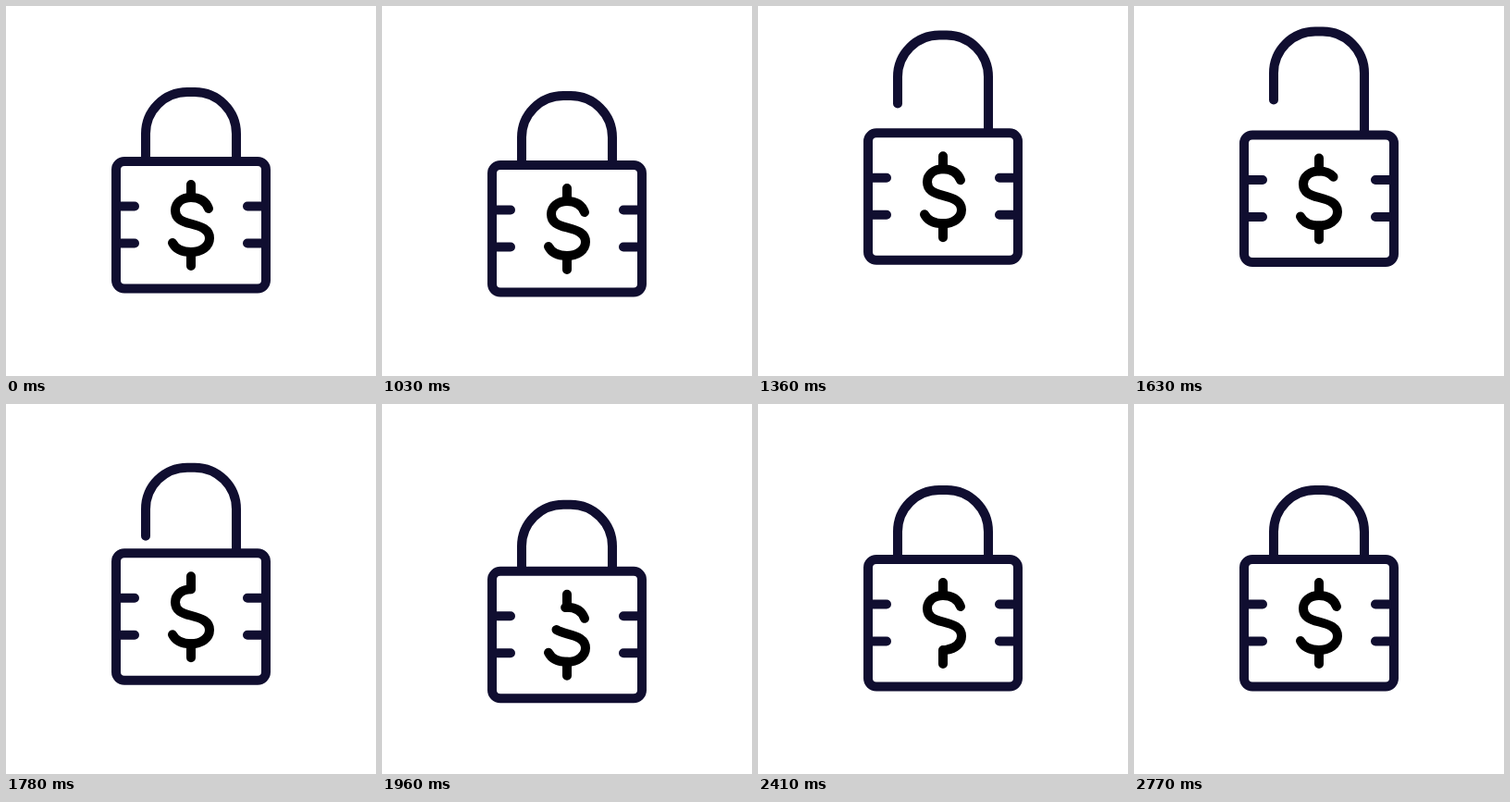
An HTML page for the animation above (2.89 s loop, 400x400 px).

```html
<!DOCTYPE html>
<html lang="en">
<head>
<meta charset="utf-8">
<title>Money lock</title>
<style>
  html, body { margin: 0; width: 100%; height: 100%; overflow: hidden; background: #fff; }
  svg { display: block; width: 100vw; height: 100vh; }
  path, rect { fill: none; stroke: #100e30; stroke-width: 10; stroke-linecap: round; stroke-linejoin: round; }
  rect { fill: #fff; }
  .dollar path { stroke: #000; }
</style>
</head>
<body>
<svg viewBox="0 0 400 400">
  <path id="shackle" d="M151 167V138A45 45 0 0 1 196 93H204A45 45 0 0 1 249 138V215"/>
  <g id="body">
    <rect x="119" y="168" width="162" height="137.5" rx="9"/>
    <path d="M119 216.5H139M119 256.5H139M281 216.5H261M281 256.5H261"/>
    <g class="dollar">
      <path d="M200 193V207M200 266V281"/>
      <path id="head" pathLength="100"/>
      <path id="tail" pathLength="100"/>
    </g>
  </g>
</svg>
<script>
const LOOP = 2890, START = 1030, STEP = 30;
const CURVE = 'M219 219C216 211 209 207 200 207C190 207 183 213 183 221C183 230 190 233 200 235.5' +
  'C212 238.5 220 242 220 251C220 260 211 266 200 266C190 266 183 262 180 256';

// Keys are [time in ms, value]
const bodyY = [[1000, 0], [1030, 4], [1095, 13], [1210, -18], [1440, -33], [1540, -32],
  [1630, -28.5], [1945, 13], [2200, -3.5], [2420, 0]];
const lift = [[1150, 0], [1210, -3], [1430, -38], [1540, -38], [1630, -37], [1945, 3], [2100, 0]];
const erase = [[1480, 0], [1630, 4.5], [1960, 40], [2170, 100]];
const write = [[1830, 0], [1960, 17], [2200, 75], [2620, 88], [2770, 100]];

const $ = id => document.getElementById(id);
const [shackle, body, head, tail] = ['shackle', 'body', 'head', 'tail'].map($);
head.setAttribute('d', CURVE);
tail.setAttribute('d', CURVE);

const slope = (a, b) => (b[1] - a[1]) / (b[0] - a[0]);

// Tangent that never overshoots a key
function tangent(keys, i) {
  if (i === 0 || i === keys.length - 1) return 0;
  const a = slope(keys[i - 1], keys[i]), b = slope(keys[i], keys[i + 1]);
  return a * b > 0 ? 2 * a * b / (a + b) : 0;
}

function valueAt(keys, t) {
  const i = keys.findIndex(k => k[0] > t);
  if (i === 0) return keys[0][1];
  if (i < 0) return keys[keys.length - 1][1];
  const [t0, v0] = keys[i - 1], [t1, v1] = keys[i];
  const d = t1 - t0, u = (t - t0) / d, w = 1 - u;
  return v0 * w * w * (1 + 2 * u) + v1 * u * u * (3 - 2 * u) +
    d * u * w * (w * tangent(keys, i - 1) - u * tangent(keys, i));
}

function showPart(path, from, to) {
  path.style.visibility = to > from ? 'visible' : 'hidden';
  path.setAttribute('stroke-dasharray', `${to - from} 200`);
  path.setAttribute('stroke-dashoffset', -from);
}

const moveY = (el, y) => el.setAttribute('transform', `translate(0 ${y})`);

function draw(now) {
  const ms = now % LOOP;
  const t = ms < START ? 0 : START + Math.floor((ms - START) / STEP) * STEP;
  const y = valueAt(bodyY, t);
  moveY(body, y);
  moveY(shackle, y + valueAt(lift, t));
  showPart(head, 0, valueAt(write, t));
  showPart(tail, valueAt(erase, t), 100);
}

const begin = performance.now();
function tick() {
  draw(performance.now() - begin);
  requestAnimationFrame(tick);
}
tick();
</script>
</body>
</html>
```
